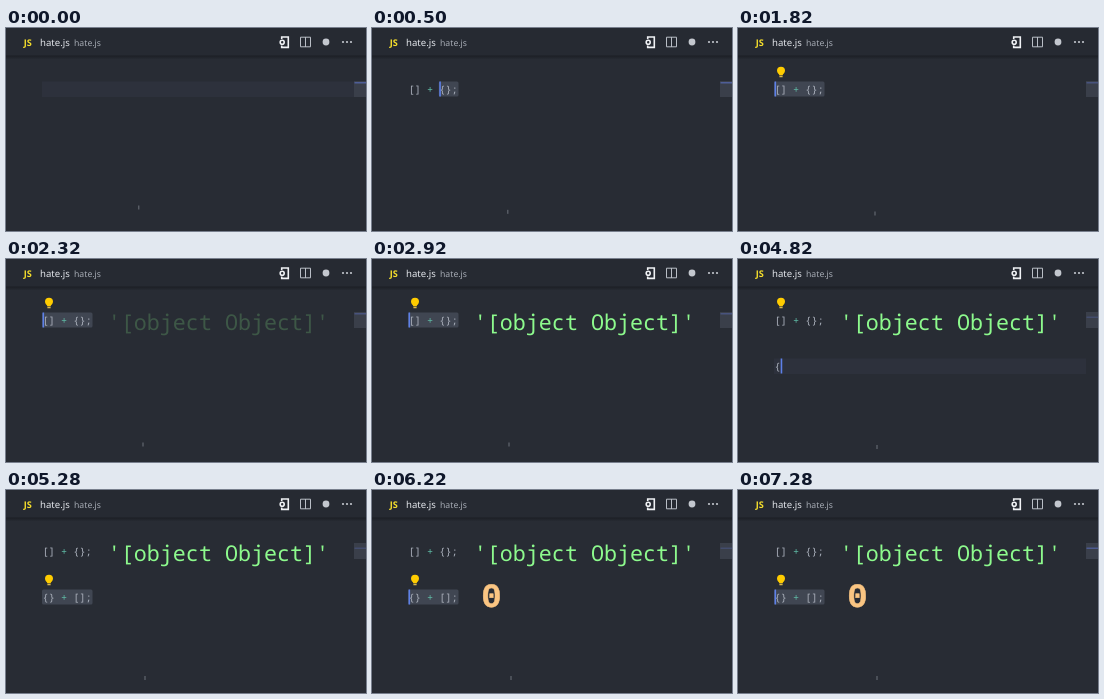
Recreate the animation shown at these times as an HTML page. Size 360 by 203 pixels, loop 8 s.

```html
<!DOCTYPE html>
<html lang="en">
<head>
<meta charset="utf-8">
<title>hate.js</title>
<style>
  html, body { margin: 0; width: 100%; height: 100%; overflow: hidden; background: #282c34; }
  svg { display: block; width: 100vw; height: 100vh; }
  text { white-space: pre; text-rendering: geometricPrecision; }
  .ui { font-family: "Noto Sans", "Open Sans", sans-serif; }
  .mono { font-family: "Noto Sans Mono", "DejaVu Sans Mono", monospace; }
  .zero { font: bold 34px "Liberation Mono", monospace; }
</style>
</head>
<body>
<svg viewBox="0 0 360 203">
  <defs>
    <linearGradient id="shade" x2="0" y2="1">
      <stop stop-color="#1b1e24"/>
      <stop offset="1" stop-color="#1b1e24" stop-opacity="0"/>
    </linearGradient>
  </defs>
  <rect width="360" height="203" fill="#282c34"/>
  <rect width="360" height="28" fill="#262a32"/>
  <rect y="27.5" width="360" height="4" fill="url(#shade)"/>

  <g class="ui">
    <text x="17.7" y="17.7" font-size="9.2" font-weight="800" fill="#f5de2c">JS</text>
    <text x="34" y="18" font-size="9.6" fill="#e2e5ea">hate.js</text>
    <text x="68" y="18" font-size="8.7" fill="#a6abb4">hate.js</text>
  </g>

  <g fill="none" stroke="#b9bec6">
    <path d="M275.7 11V9h6.6v10.4h-6.6v-2" stroke="#f0f2f5" stroke-width="1.6"/>
    <circle cx="276.2" cy="14.2" r="2" stroke="#f0f2f5" stroke-width="1.6"/>
    <path d="M294.5 9.2h10v9.6h-10zM299.5 9v10"/>
  </g>
  <g fill="#c3c7ce">
    <circle cx="320" cy="14" r="3.4"/>
    <circle cx="337" cy="14" r="1.1"/>
    <circle cx="341" cy="14" r="1.1"/>
    <circle cx="345" cy="14" r="1.1"/>
  </g>

  <rect x="348" y="53" width="12" height="16" fill="#3a3f4a"/>
  <rect id="mark" x="348.5" width="11.5" height="1.5" fill="#5262a0"/>

  <g id="rows"></g>

  <text id="result" class="mono" x="101.8" y="71" font-size="21.7" font-weight="500" fill="#8dfa8d">'[object Object]'</text>
  <text id="zero" class="zero" x="109.3" y="117" fill="#fac582" stroke="#fac582" stroke-width=".5">0</text>
  <rect id="pointer" width="1" height="4" fill="#6d727b"/>
</svg>

<script>
const LOOP = 8000, CHAR = 6.15, LEFT = 36.5;
const $ = id => document.getElementById(id);
const ramp = (t, a, b) => Math.min(1, Math.max(0, (t - a) / (b - a)));
const set = (el, attrs) => { for (const k in attrs) el.setAttribute(k, attrs[k]); };

// Each row is typed, then selected backwards, then gets its light bulb.
const rows = [
  { code: '[] + {};', dy: 0, start: 0, end: 4740, type: [40, 400], select: [440, 600], lit: [640, 5020] },
  { code: '{} + [];', dy: 46, start: 4740, end: LOOP, type: [4740, 5100], select: [5140, 5240], lit: [5260, LOOP] }
];

for (const row of rows) {
  $('rows').insertAdjacentHTML('beforeend', `
    <g transform="translate(0 ${row.dy})">
      <rect x="36" y="53.5" width="312" height="15.5" fill="#2d313c"/>
      <rect y="53.5" height="15" rx="1.5" fill="#404652"/>
      <text class="mono" x="36.5" y="65" font-size="10.25" fill="#a9afba"><tspan></tspan><tspan fill="#5fbba6"></tspan><tspan></tspan></text>
      <rect y="53.5" width="1.6" height="15" fill="#5d80e8"/>
      <g>
        <path d="M41.3 47.3C41.3 45.8 39 45.3 39 42.7a4 4 0 0 1 8 0C47 45.3 44.7 45.8 44.7 47.3z" fill="#fc0"/>
        <path d="M41.4 48.5h3.2" stroke="#d9b94a" stroke-width="1.5"/>
      </g>
    </g>`);
  const [line, selection, text, caret, bulb] = $('rows').lastElementChild.children;
  Object.assign(row, { line, selection, caret, bulb, parts: text.children });
}

function drawRow(row, t) {
  const active = t >= row.start && t < row.end;
  const typed = Math.floor(8 * ramp(t, ...row.type));
  const selected = Math.round(8 * ramp(t, ...row.select));
  const x = LEFT + (typed - selected) * CHAR;
  set(row.line, { opacity: +(active && !selected) });
  set(row.selection, { x: x - .5, width: selected * CHAR + 1.3, opacity: +(active && selected > 0) });
  [[0, 3], [3, 4], [4, 8]].forEach(([a, b], i) => {
    row.parts[i].textContent = row.code.slice(a, Math.max(a, Math.min(b, typed)));
  });
  let glow = +(active && typed > 0);
  if (t >= 5260) glow *= ramp(t, 5720, 5920);
  set(row.caret, { x, opacity: glow });
  set(row.bulb, { opacity: +(t >= row.lit[0] && t < row.lit[1]) });
}

function draw(now) {
  const t = now % LOOP;
  for (const row of rows) drawRow(row, t);
  set($('result'), { opacity: ramp(t, 2290, 2440) });
  set($('zero'), { opacity: ramp(t, 6050, 6220) });
  set($('mark'), { y: t < 4740 ? 54 : 57.5, opacity: t < 600 ? .9 : t < 4740 ? .6 : t < 6740 ? .4 : .8 });
  const move = ramp(t, 40, 680), nudge = t >= 4520;
  set($('pointer'), {
    x: 132.3 + 4.2 * move + 2 * nudge,
    y: 177.5 + 6 * move + 2.5 * nudge
  });
  requestAnimationFrame(() => draw(performance.now()));
}
draw(0);
</script>
</body>
</html>
```
